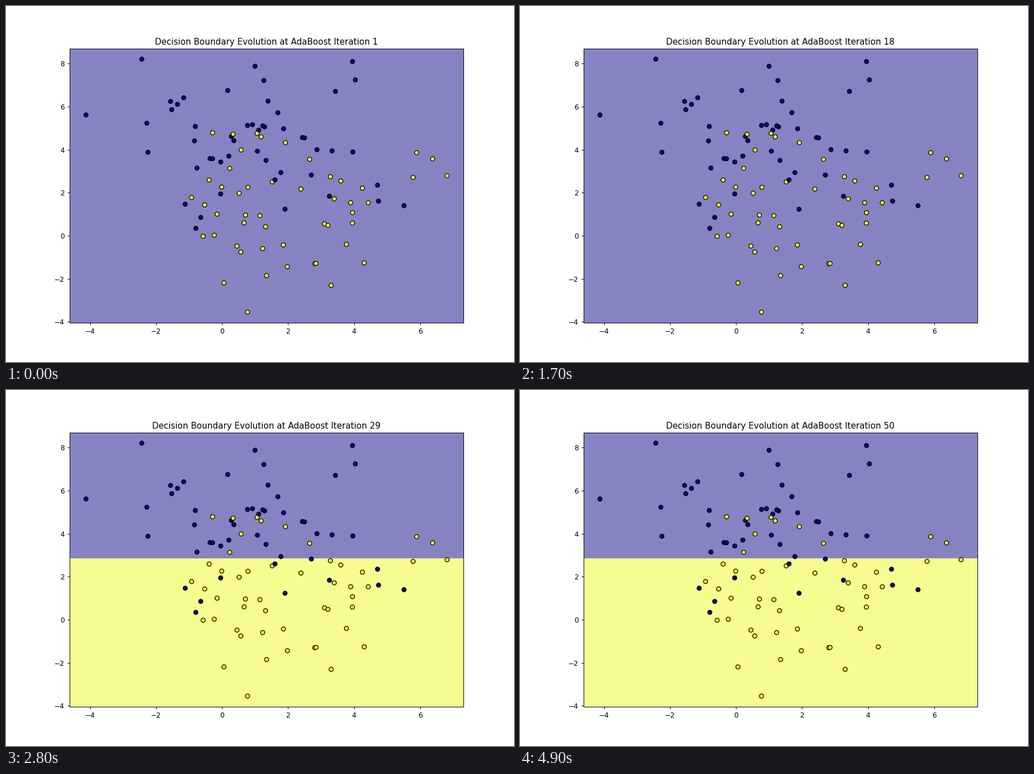
A matplotlib script for the animation above (5 s loop, 894x626 px).

```python
import matplotlib.pyplot as plt
import numpy as np
from matplotlib.animation import FuncAnimation

FRAMES = 50
INTERVAL = 100
DPI = 89.4
PER_CLASS = 50
SPREAD = 2.0
MARGIN = 0.5
GRID_STEP = 0.02

# (first iteration, height of the boundary) for each stage of the classifier
STAGES = [(19, 1.43), (23, 2.845)]


def make_clusters(seed=0):
    """Two shuffled Gaussian clusters and their class labels."""
    rng = np.random.RandomState(seed)
    centers = rng.uniform(-10, 10, size=(2, 2))
    points = np.vstack([rng.normal(c, SPREAD, (PER_CLASS, 2)) for c in centers])
    labels = np.repeat([0, 1], PER_CLASS)
    order = np.arange(len(points))
    rng.shuffle(order)
    return points[order], labels[order]


def grid_limits(values):
    """First and last value of an evenly spaced grid around the data."""
    grid = np.arange(values.min() - MARGIN, values.max() + MARGIN, GRID_STEP)
    return grid[0], grid[-1]


def tint(color, alpha=0.5):
    """Blend a colour with white."""
    return tuple(alpha * c + 1 - alpha for c in color[:3])


points, labels = make_clusters()
left, right = grid_limits(points[:, 0])
bottom, top = grid_limits(points[:, 1])
cmap = plt.get_cmap("plasma")

plt.rcParams["font.family"] = "DejaVu Sans"
# The tiny surplus keeps the pixel size from rounding down.
fig, ax = plt.subplots(figsize=(894.001 / DPI, 626.001 / DPI), dpi=DPI)
ax.set_facecolor(tint(cmap(0.0)))
region = plt.Rectangle((left, bottom), right - left, 0,
                       facecolor=tint(cmap(1.0)), edgecolor="none", zorder=0.5)
ax.add_patch(region)
ax.scatter(*points.T, c=labels, cmap=cmap, edgecolors="k")
ax.set_xlim(left, right)
ax.set_ylim(bottom, top)
title = ax.set_title("")


def boundary(iteration):
    level = bottom
    for start, height in STAGES:
        if iteration >= start:
            level = height
    return level


def update(frame):
    iteration = frame + 1
    level = boundary(iteration)
    region.set_height(level - bottom)
    region.set_visible(level > bottom)
    title.set_text(f"Decision Boundary Evolution at AdaBoost Iteration {iteration}")
    return region, title


animation = FuncAnimation(fig, update, frames=FRAMES, interval=INTERVAL,
                          repeat=True, repeat_delay=0)
plt.show()
```
